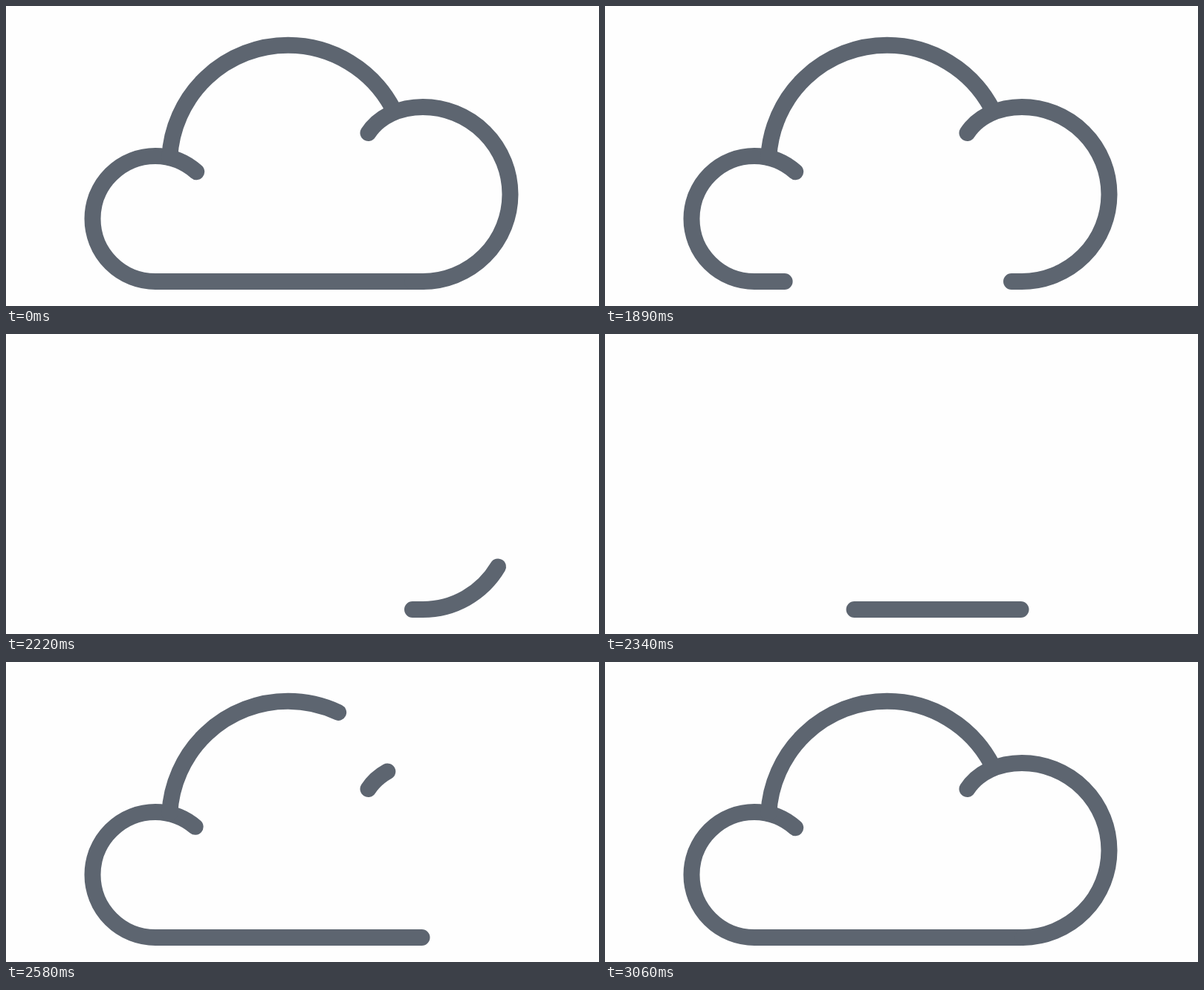
Write an HTML page that moves like this. It is 798x404 px and loops after 6330 ms.

```html
<!DOCTYPE html>
<html lang="en">
<head>
<meta charset="utf-8">
<title>Cloud line drawing</title>
<style>
  html, body { margin: 0; width: 100%; height: 100%; overflow: hidden; background: #fefefe; }
  svg { display: block; width: 798px; height: 404px; }
  path { fill: none; stroke: #5d6570; stroke-width: 22; stroke-linecap: round; }
</style>
</head>
<body>
<svg viewBox="0 0 798 404">
  <path id="left" d="M559.5 371H201A84.5 84.5 0 0 1 201 202A84.5 84.5 0 0 1 256.2 223.2"/>
  <path id="top" d="M220.2 204A159.5 159.5 0 0 1 379.5 52.8A159.5 159.5 0 0 1 521.1 139"/>
  <path id="right" d="M487.5 171C502 148.5 530 136 561 136A117.5 117.5 0 0 1 561 371H547"/>
</svg>
<script>
const LOOP = 6330, STEP = 30;

// Each phase: start (ms), duration (ms), power of the ease.
// Erasing eases in, drawing eases out.
const strokes = [
  { id: 'left',  erase: [1296, 767, 3],   draw: [2265, 323, 1.5] },
  { id: 'top',   erase: [1970, 195, 1.5], draw: [2462, 196, 1.5] },
  { id: 'right', erase: [1958, 311, 2],   draw: [2561, 736, 3] }
];

for (const s of strokes) {
  s.el = document.getElementById(s.id);
  s.len = s.el.getTotalLength();
}

const clamp = v => Math.min(1, Math.max(0, v));
const easeIn = (t, [start, dur, pow]) => clamp((t - start) / dur) ** pow;
const easeOut = (t, [start, dur, pow]) => 1 - (1 - clamp((t - start) / dur)) ** pow;

function show({ el, len }, from, to) {
  const visible = (to - from) * len;
  el.style.display = visible > 0.01 ? '' : 'none';
  if (from === 0 && to === 1) {
    el.style.strokeDasharray = 'none';
    return;
  }
  el.style.strokeDasharray = `${visible} ${len * 2}`;
  el.style.strokeDashoffset = -from * len;
}

function render(t) {
  for (const s of strokes) {
    if (t < s.draw[0]) show(s, easeIn(t, s.erase), 1);
    else show(s, 0, easeOut(t, s.draw));
  }
}

const origin = performance.now();

function tick() {
  const t = (performance.now() - origin) % LOOP;
  render(Math.floor(t / STEP) * STEP);
  requestAnimationFrame(tick);
}

tick();
</script>
</body>
</html>
```
